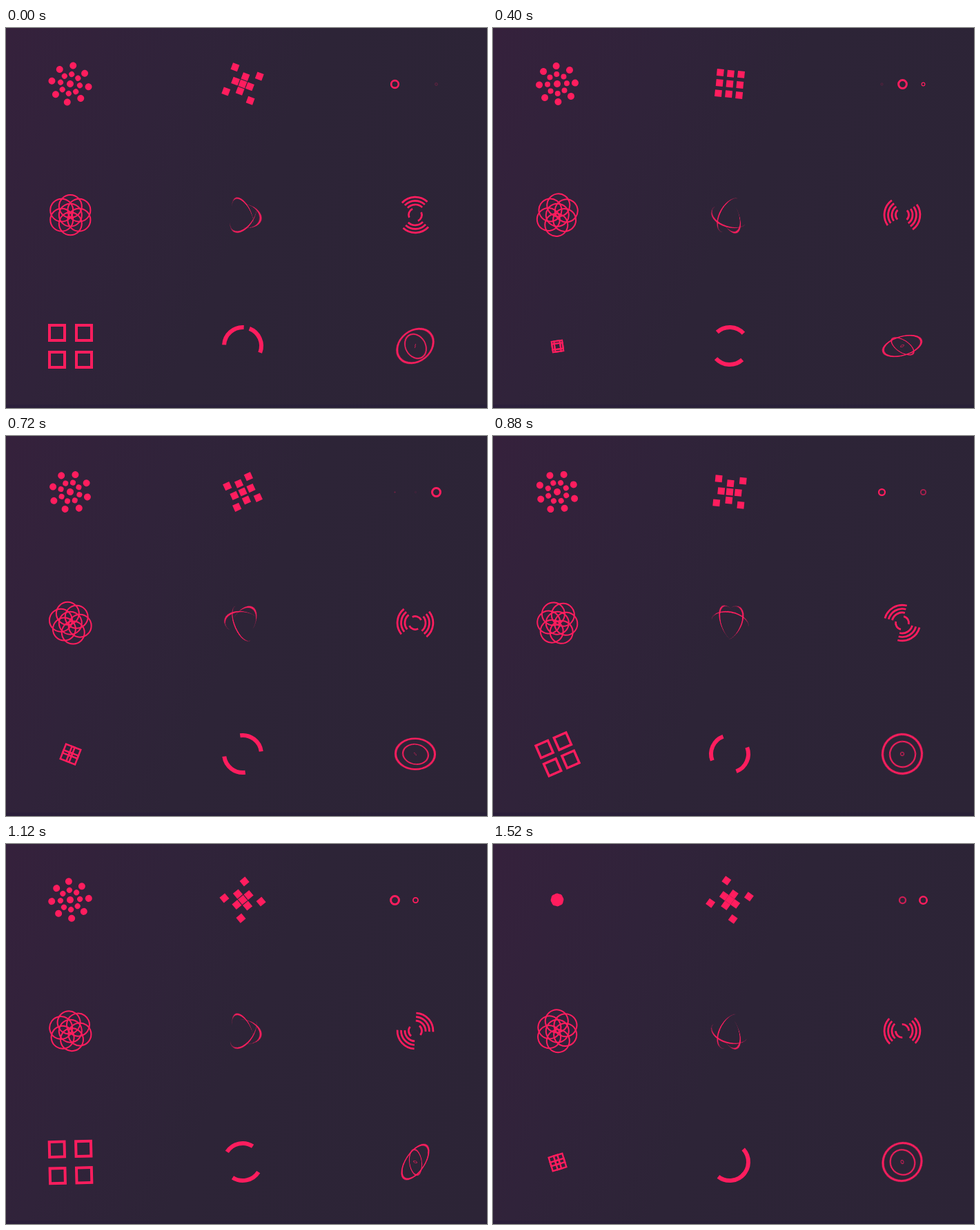
Animation of 697 by 551 pixels, one loop 1.6 s. Source, as an HTML page:

```html
<!DOCTYPE html>
<html lang="en">
<head>
<meta charset="utf-8">
<title>Loading spinners</title>
<style>
  html, body { margin: 0; width: 100%; height: 100%; overflow: hidden; }
  body {
    position: relative;
    background: linear-gradient(113.5deg, #35213c 0, #30233a 28%, #2d2437 50%, #2c2436 100%);
  }
  body::after {
    content: ""; position: absolute; left: 0; right: 0; top: 546px; height: 5px;
    background: rgba(35, 27, 58, .4);
  }
  svg { position: absolute; left: 0; top: 0; display: block; }
  .orbits, .rings { position: absolute; }
  .orbits { left: 315.5px; top: 243.5px; width: 55px; height: 55px; perspective: 800px; }
  .rings { left: 593px; top: 461px; }
  .orbits div, .rings div {
    position: absolute; box-sizing: border-box; border-radius: 50%;
    border: 0 solid #ff1d5e;
  }
  .orbits div { width: 100%; height: 100%; }
</style>
</head>
<body>
<svg id="stage" width="697" height="551" viewBox="0 0 697 551"></svg>
<div class="orbits" id="orbits"></div>
<div class="rings" id="rings"></div>
<script>
const COLOR = '#ff1d5e';
const LOOP = 1600, STEP = 80, TICK = 1000 / 12;
const stage = document.getElementById('stage');
const range = n => Array.from({ length: n }, (_, i) => i);
const wrap = v => v - Math.floor(v);
const mix = (a, b, f) => a + (b - a) * f;

// cubic-bezier(.25, .1, .25, 1)
function ease(x) {
  let lo = 0, hi = 1, s = .5;
  for (let i = 0; i < 24; i++) {
    s = (lo + hi) / 2;
    if (.75 * s - .75 * s * s + s ** 3 < x) lo = s; else hi = s;
  }
  return .3 * s * (1 - s) ** 2 + 3 * s * s * (1 - s) + s ** 3;
}

function set(node, attrs) {
  for (const key in attrs) node.setAttribute(key, attrs[key]);
}
function add(parent, tag, attrs) {
  const node = document.createElementNS('http://www.w3.org/2000/svg', tag);
  set(node, attrs);
  return parent.appendChild(node);
}
const group = (x, y, attrs) =>
  add(add(stage, 'g', { transform: `translate(${x} ${y})` }), 'g', attrs);
const solid = { fill: COLOR };
const line = width => ({ fill: 'none', stroke: COLOR, 'stroke-width': width });
const turn = (node, deg) => set(node, { transform: `rotate(${deg})` });

// unit grid around the centre, without the centre itself
const around = range(9).filter(i => i !== 4).map(i => [i % 3 - 1, Math.floor(i / 3) - 1]);

function flower() {
  const g = group(93, 81, solid);
  add(g, 'circle', { r: 5 });
  const rows = [[5, 26, 19], [4, 14, 10]].map(([r, side, diag]) =>
    around.map(([x, y]) => ({ node: add(g, 'circle', { r }), x, y, d: x && y ? diag : side })));
  return ms => {
    const p = wrap(.249 + ms / 2500);
    const half = p < .5 ? 0 : 1;
    const open = p < .25 ? ease(p * 4) : p < .75 ? 1 : 1 - ease((p - .75) * 4);
    turn(g, 180 * (half + ease(p * 2 - half)));
    rows.flat().forEach(o => set(o.node, { cx: o.x * o.d * open, cy: o.y * o.d * open }));
  };
}

function pixels() {
  const g = group(343, 81, solid);
  const box = { x: -5, y: -5, width: 10, height: 10 };
  add(g, 'rect', box);
  const parts = around.map(([x, y]) => ({ node: add(g, 'rect', box), x, y }));
  return ms => {
    const p = wrap(.807 + ms / 2000);
    const open = p < .5 ? p * 2 : p < .75 ? 1 : (1 - p) * 4;
    turn(g, 360 * p);
    parts.forEach(({ node, x, y }) => {
      const d = mix(15, x && y ? 20 : 10, open);
      set(node, { x: x * d - 5, y: y * d - 5 });
    });
  };
}

function hollowDots() {
  const dots = range(3).map(i => {
    const g = group(563.5 + 30 * i, 81.5, line(3));
    add(g, 'circle', { r: 6 });
    return g;
  });
  return ms => dots.forEach((g, i) => {
    const p = wrap(.305 + (ms - 300 * i) / 1000);
    const out = p < .5 ? 0 : ease(p * 2 - 1);
    const size = p < .5 ? ease(p * 2) : 1 - out;
    set(g, { transform: `scale(${size})`, opacity: 1 - out });
  });
}

function circles() {
  const g = group(93.3, 271.2, line(2));
  const far = 12.6, near = 7;
  const spots = [[0, 0], [0, -far], [0, far]];
  for (const x of [-far, far]) spots.push([x, near], [x, -near]);
  spots.forEach(([cx, cy]) => add(g, 'circle', { cx, cy, r: 16.5 }));
  return ms => turn(g, 360 * ms / 1200);
}

// quarter of a circle, centred on the given direction in degrees
function quarter(g, r, deg) {
  const at = a => `${r * Math.cos(a * Math.PI / 180)} ${r * Math.sin(a * Math.PI / 180)}`;
  add(g, 'path', { d: `M${at(deg - 45)}A${r} ${r} 0 0 1 ${at(deg + 45)}` });
}

function radar() {
  const unit = 60 / 22;
  const rings = range(4).map(i => {
    const g = group(593, 271, line(unit));
    [0, 180].forEach(deg => quarter(g, 30 - unit * (1.5 + 2 * i), deg));
    return g;
  });
  return ms => rings.forEach((g, i) => {
    const p = wrap(.65 + (ms + (i === 3 ? 300 : 0)) / 2000);
    turn(g, 180 * (p < .5 ? ease(p * 2) : 1 - ease(p * 2 - 1)));
  });
}

function squares() {
  const g = group(93.5, 461.5, line(2));
  const parts = around.filter(([x, y]) => x && y).map(([x, y]) => ({
    node: add(g, 'rect', { x: -5.5, y: -5.5, width: 11, height: 11 }), x, y
  }));
  return ms => {
    const p = wrap(.487 + ms / 1250);
    const half = p < .5 ? 0 : 1;
    const e = ease(p * 2 - half);
    const open = half ? 1 - e : e;
    turn(g, 90 * (half + e));
    parts.forEach(({ node, x, y }) => set(node, {
      transform: `translate(${19.5 * x * open} ${19.5 * y * open}) scale(${1 + open})`
    }));
  };
}

function halfCircles() {
  const [top, bottom] = [-90, 90].map(deg => {
    const g = group(343, 461, line(6));
    quarter(g, 27, deg);
    return g;
  });
  return ms => {
    const v = ms / 1000 - .401;
    const swing = wrap(v / 2) * 2;
    turn(top, 360 * ease(wrap(v)));
    turn(bottom, 360 * ease(swing < 1 ? swing : 2 - swing));
  };
}

function block(parent, style) {
  const node = document.createElement('div');
  Object.assign(node.style, style);
  return document.getElementById(parent).appendChild(node);
}

function orbits() {
  const parts = [['Bottom', 35, -45], ['Right', 50, 10], ['Top', 35, 55]].map(([side, x, y]) => ({
    node: block('orbits', { [`border${side}Width`]: '3px' }),
    tilt: `rotateX(${x}deg) rotateY(${y}deg)`
  }));
  return ms => parts.forEach(({ node, tilt }) => {
    node.style.transform = `${tilt} rotateZ(${360 * wrap(ms / 1200)}deg)`;
  });
}

function rings() {
  const nodes = [[60, 3], [39, 2], [6, 1]].map(([size, border]) => block('rings', {
    width: size + 'px', height: size + 'px', borderWidth: border + 'px',
    left: -size / 2 + 'px', top: -size / 2 + 'px'
  }));
  return ms => {
    const p = wrap(.393 + ms / 1500);
    const spin = (node, z, axis, deg) => {
      node.style.transform = `rotateZ(${z}deg) rotate${axis}(${deg}deg)`;
    };
    spin(nodes[0], mix(20, 100, p), 'Y', 360 * p);
    spin(nodes[1], mix(100, 0, p), 'X', 360 * p);
    spin(nodes[2], mix(100, -360, p), 'X', mix(-360, 360, p));
  };
}

const spinners = [flower, pixels, hollowDots, circles, orbits, radar, squares, halfCircles, rings]
  .map(make => make());
const start = performance.now();

function draw(now) {
  const t = Math.max(0, now - start) % LOOP;
  const ms = Math.floor(t / STEP) * TICK;
  spinners.forEach(update => update(ms));
}
function frame(now) {
  draw(now);
  requestAnimationFrame(frame);
}
draw(start);
requestAnimationFrame(frame);
</script>
</body>
</html>
```
